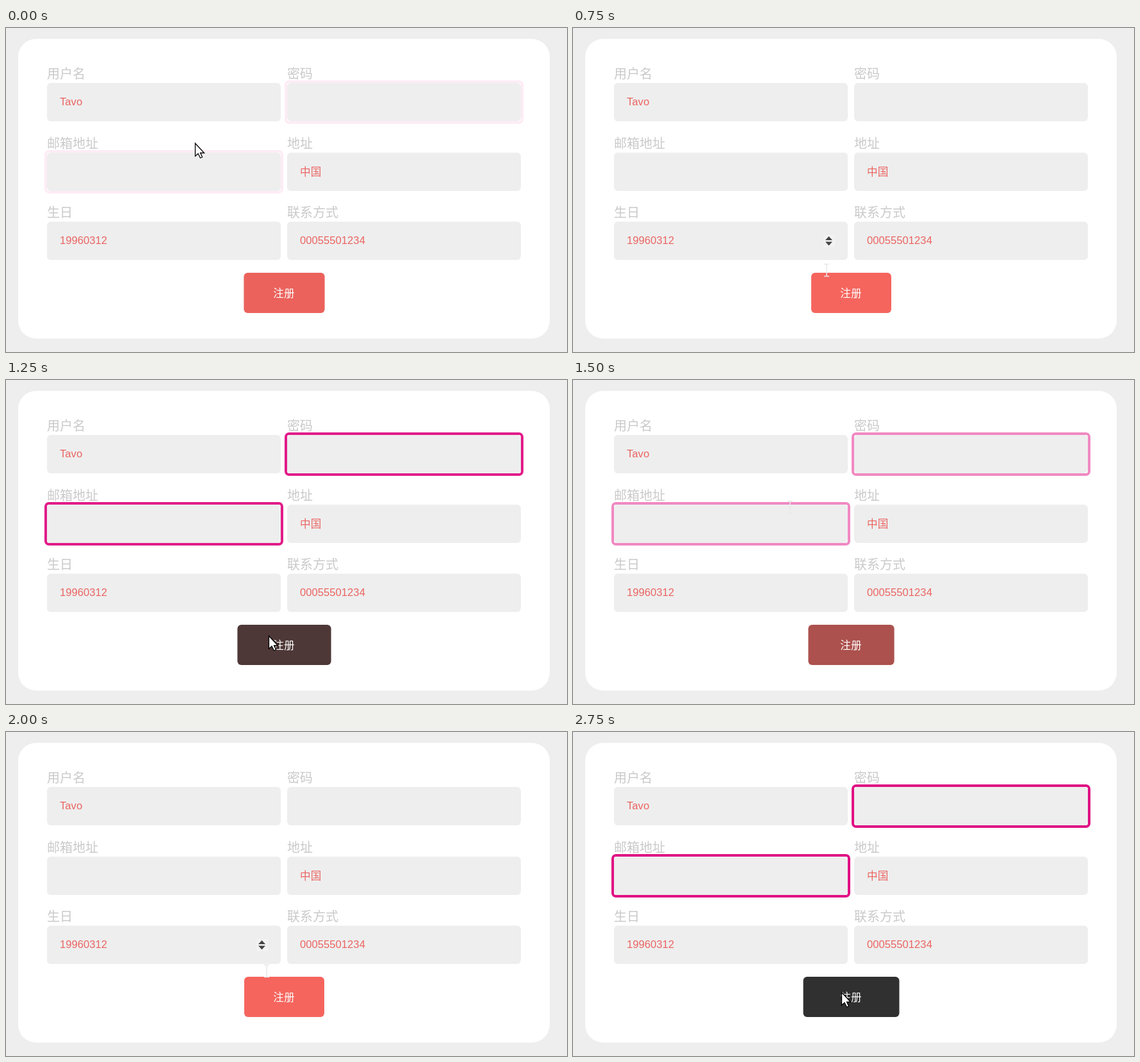
An HTML page for the animation above (3750 ms loop, 876x507 px).

```html
<!DOCTYPE html>
<html lang="zh-CN">
<head>
<meta charset="utf-8">
<title>注册</title>
<style>
  html, body { margin: 0; width: 100%; height: 100%; overflow: hidden; background: #eee; }
  svg { display: block; }
  text { font: 16.67px "Liberation Sans", "Noto Sans CJK SC", "Noto Sans CJK", sans-serif; fill: #ea6562; }
  .label { font: 20px "Noto Sans CJK SC", "Noto Sans CJK", sans-serif; fill: #c9c9c9; }
  .ring { fill: none; stroke: #e01083; stroke-width: 4; }
</style>
</head>
<body>
<svg width="876" height="507" viewBox="0 0 876 507">
  <rect x="19" y="17" width="830" height="469" rx="28" fill="#fff"/>
  <g id="fields"></g>
  <g id="spinner" fill="#444">
    <rect x="391" y="324" width="18" height="19" fill="#f2f2f2"/>
    <path d="M394 332l5.5-6 5.5 6zM394 334.5h11l-5.5 6z"/>
  </g>
  <rect id="button" y="383" height="63" rx="6"/>
  <text x="434" y="421" text-anchor="middle" style="fill:#fff">注册</text>
  <path id="arrow" d="M.5 .5V20.5L5 16.5L8.5 23.5L11.5 22L8.5 15.5H14.5Z" fill="#fff" stroke="#000" stroke-width="1.3"/>
  <path id="beam" d="M-4-9.5H-1L0-8.5L1-9.5H4M0-8.5V8.5M-4 9.5H-1L0 8.5L1 9.5H4" fill="none" stroke="#e8e8e8" stroke-width="1.5"/>
</svg>
<script>
const $ = id => document.getElementById(id);

const fields = [
  ['用户名', 'Tavo'], ['密码', ''],
  ['邮箱地址', ''], ['地址', '中国'],
  ['生日', '19960312'], ['联系方式', '00055501234'],
];
const rowTops = [86, 195, 303];

$('fields').innerHTML = fields.map(([label, value], i) => {
  const x = 64 + 375 * (i % 2), y = rowTops[i >> 1];
  const ring = value ? '' : `<rect class="ring" x="${x - 2}" y="${y - 2}" width="369" height="64" rx="5"/>`;
  return `<text class="label" x="${x}" y="${y - 7}">${label}</text>
    <rect x="${x}" y="${y}" width="365" height="60" rx="6" fill="#eee"/>${ring}
    <text x="${x + 20}" y="${y + (y === 195 ? 36 : 35)}">${value}</text>`;
}).join('');
const rings = document.querySelectorAll('.ring');

// The screen refreshes every 250 ms; the last pose holds until the loop ends.
// Each pose: pointer, x, y, button hover amount, ring opacity, spinner shown
const STEP = 250, LOOP = 3750;
const poses = [
  ['arrow', 295, 180, .05, .08, 0],
  ['arrow', 324, 293, 0, 0, 1],
  ['arrow', 332, 277, 0, 0, 1],
  ['beam', 396, 379, 0, 0, 1],
  ['arrow', 417, 421, .52, .77, 0],
  ['arrow', 410, 400, .85, .95, 0],
  ['beam', 339, 199, .37, .49, 0],
  ['arrow', 345, 280, .05, .08, 0],
  ['beam', 407, 374, 0, 0, 1],
  ['arrow', 418, 406, .52, .77, 0],
  ['arrow', 418, 406, .95, .97, 0],
  ['arrow', 419, 407, 1, 1, 0],
];

const show = (el, on) => el.setAttribute('visibility', on ? 'visible' : 'hidden');
const mix = (a, b, t) => a.map((v, i) => Math.round(v + (b[i] - v) * t));

function draw(now) {
  const step = Math.floor(now % LOOP / STEP);
  const [pointer, x, y, hover, ring, spinner] = poses[Math.min(step, poses.length - 1)];
  for (const id of ['arrow', 'beam']) {
    show($(id), id === pointer);
    $(id).setAttribute('transform', `translate(${x} ${y})`);
  }
  const width = 125 + 25 * hover;
  $('button').setAttribute('x', 434.5 - width / 2);
  $('button').setAttribute('width', width);
  $('button').setAttribute('fill', `rgb(${mix([245, 101, 94], [48, 48, 48], hover)})`);
  rings.forEach(r => r.setAttribute('opacity', ring));
  show($('spinner'), spinner);
}

const start = performance.now();
function tick() {
  draw(performance.now() - start);
  requestAnimationFrame(tick);
}
tick();
</script>
</body>
</html>
```
